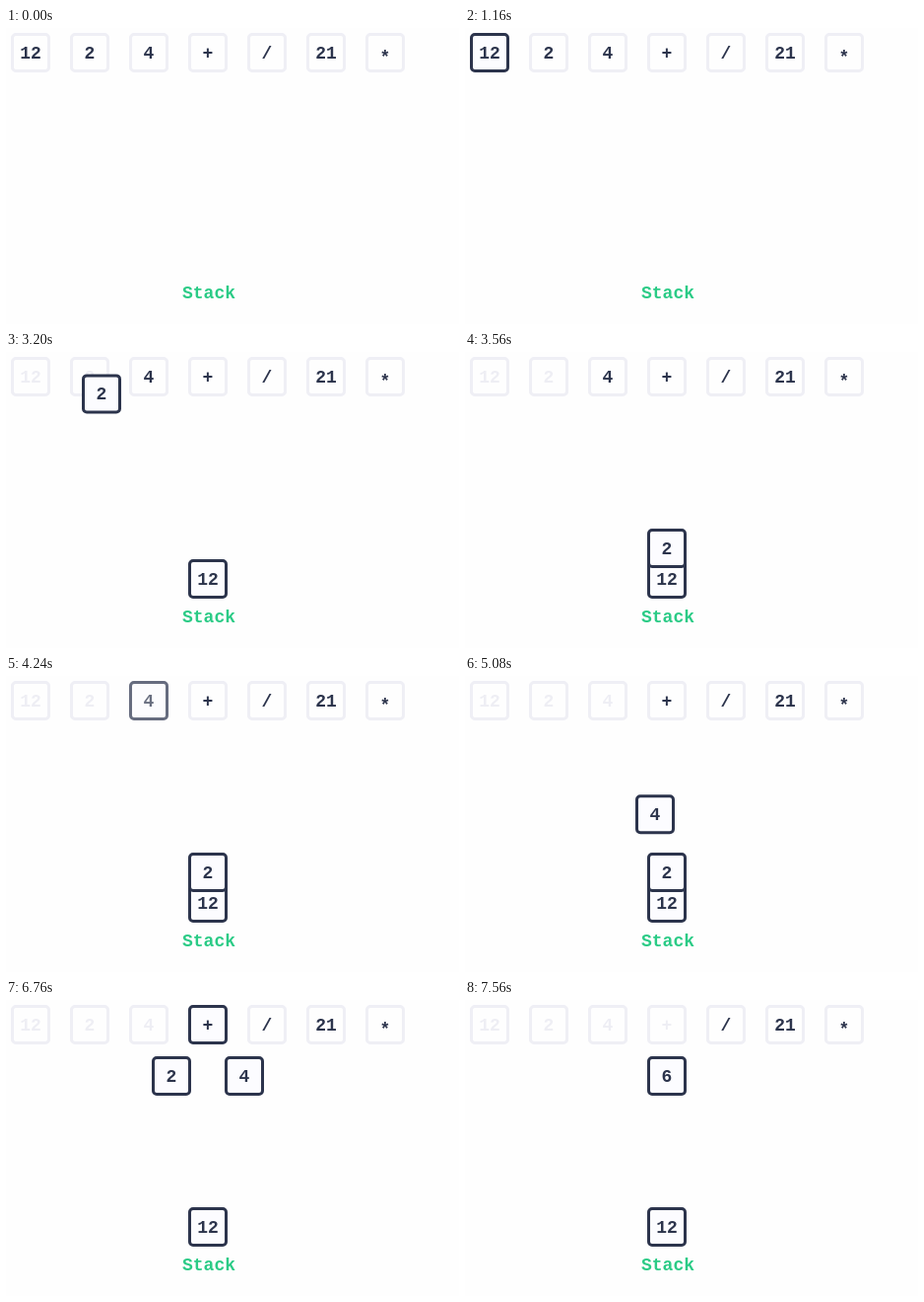
Recreate the animation shown at these times as an HTML page with a canvas. Size 460 by 300 pixels, loop 8 s.

```html
<!DOCTYPE html>
<html lang="en">
<head>
<meta charset="utf-8">
<title>Postfix evaluation</title>
<style>
  html, body { margin: 0; width: 100%; height: 100%; overflow: hidden; background: #fefefe; }
  canvas { display: block; }
</style>
</head>
<body>
<canvas id="stage" width="460" height="300"></canvas>
<script>
const ctx = document.getElementById('stage').getContext('2d');
const LOOP = 8000, STEP = 40, STEPS = 10;
const DARK = '#2c344c', PALE = '#efeff5', FAINT = '#eeeef4', GREEN = '#2bcb86';
const PAPER = '#fefefe', FILL = '#fcfcff';
const SIZE = 40, RESULT = [185, 57];
const SPLIT = 6400, MERGE = 7200;

const tokens = ['12', '2', '4', '+', '/', '21', '*'];
const slot = i => [5 + 60 * i, 5];

// Each token lights up in its slot, then travels along its stops.
const tiles = [
  { index: 0, lit: 800, stops: [[1600, [185, 210]]] },
  { index: 3, lit: 5600, stops: [[MERGE, RESULT]] },
  { index: 1, lit: 2400, stops: [[3200, [185, 179]], [SPLIT, [148, 57]], [MERGE, RESULT]] },
  { index: 2, lit: 4000, stops: [[4800, [185, 149]], [SPLIT, [222, 57]], [MERGE, RESULT]] }
];
const litAt = Object.fromEntries(tiles.map(tile => [tile.index, tile.lit]));

// Linear progress in ten discrete steps; the first step is already visible at the start.
function progress(t, start) {
  return t < start ? 0 : Math.min(1, (Math.floor((t - start) / STEP) + 1) / STEPS);
}

function drawText(text, x, y, color) {
  ctx.fillStyle = color;
  ctx.fillText(text, x, y);
}

function drawTile(label, [x, y], border, color, fill) {
  ctx.beginPath();
  ctx.roundRect(x + 1.5, y + 1.5, SIZE - 3, SIZE - 3, 3.5);
  ctx.fillStyle = fill;
  ctx.fill();
  ctx.strokeStyle = border;
  ctx.stroke();
  drawText(label, x + SIZE / 2, y + (label === '*' ? 30 : 26), color);
}

function position(tile, t) {
  return tile.stops.reduce((from, [start, to]) => {
    const p = progress(t, start);
    return from.map((v, k) => v + (to[k] - v) * p);
  }, slot(tile.index));
}

function draw(t) {
  ctx.globalAlpha = 1;
  ctx.fillStyle = PAPER;
  ctx.fillRect(0, 0, 460, 300);
  ctx.font = 'bold 18px "Liberation Mono", monospace';
  ctx.textAlign = 'center';
  ctx.lineWidth = 3;

  drawText('Stack', 206, 274, GREEN);
  tokens.forEach((label, i) =>
    drawTile(label, slot(i), PALE, t >= litAt[i] ? FAINT : DARK, PAPER));

  const merged = progress(t, MERGE) === 1;
  for (const tile of tiles) {
    if (merged && tile.index > 0) continue;
    ctx.globalAlpha = progress(t, tile.lit);
    drawTile(tokens[tile.index], position(tile, t), DARK, DARK, FILL);
  }
  ctx.globalAlpha = 1;
  if (merged) drawTile('6', RESULT, DARK, DARK, FILL);
}

function frame() {
  draw(performance.now() % LOOP);
  requestAnimationFrame(frame);
}
frame();
</script>
</body>
</html>
```
